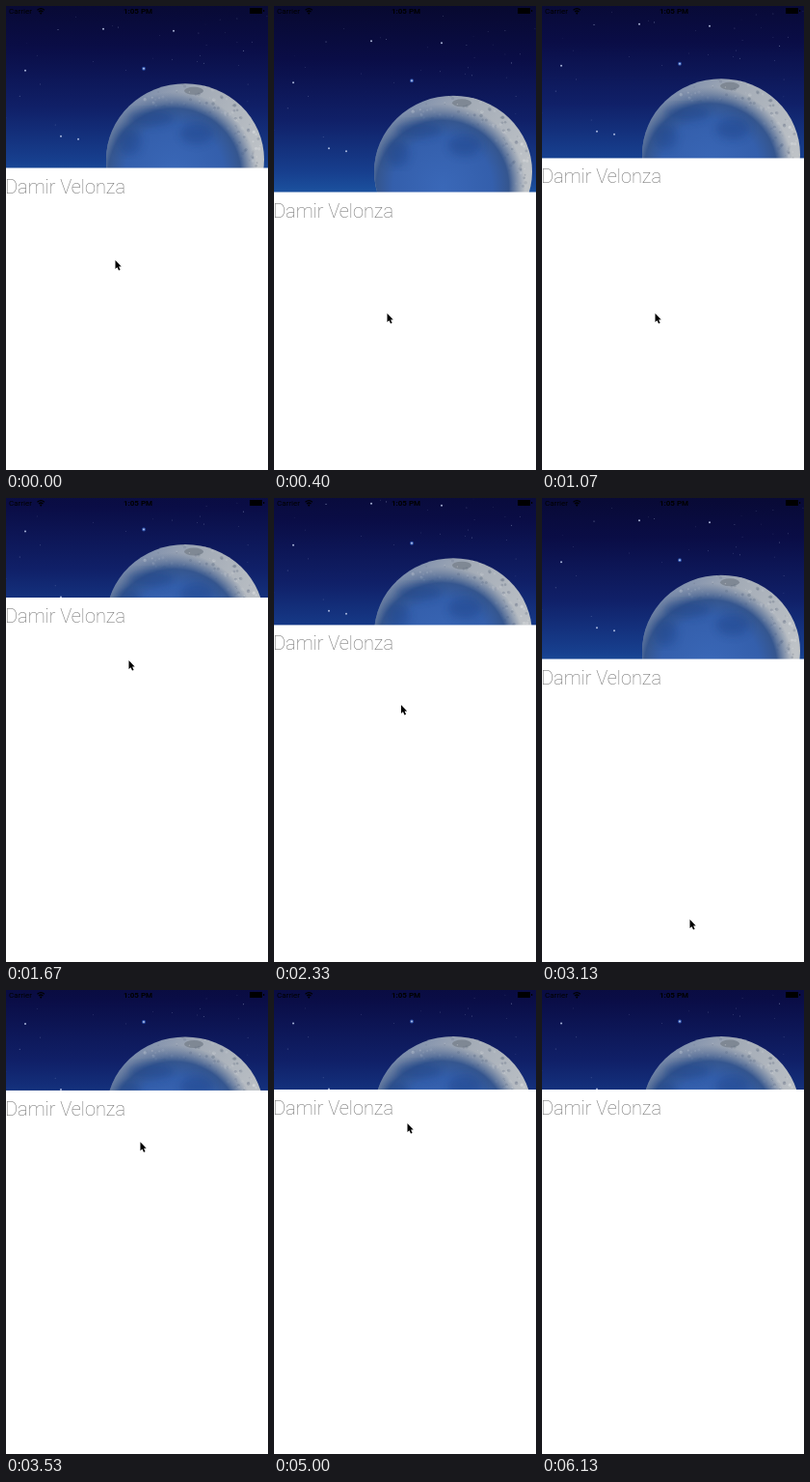
These frames come from a looping animation (272x480 px, 6.87 s). An HTML page:

```html
<!DOCTYPE html>
<html lang="en">
<head>
<meta charset="utf-8">
<title>Stretchy header</title>
<style>
  html, body { margin: 0; width: 100%; height: 100%; overflow: hidden; background: #fff; }
  svg { display: block; }
  text { font-family: Roboto, "Liberation Sans", sans-serif; }
  #name { font-size: 20px; font-weight: 100; fill: #707070; }
  .bar { font-size: 8px; fill: #000; }
</style>
</head>
<body>
<svg width="272" height="480" viewBox="0 0 272 480">
  <defs>
    <linearGradient id="night" x2="0" y2="1">
      <stop offset="0" stop-color="#07082c"/>
      <stop offset=".3" stop-color="#0a0d46"/>
      <stop offset=".6" stop-color="#102068"/>
      <stop offset=".85" stop-color="#173f8e"/>
      <stop offset="1" stop-color="#1e5ca8"/>
    </linearGradient>
    <linearGradient id="lit" x1=".1" y1="0" x2="1" y2=".5">
      <stop offset="0" stop-color="#6f83a8"/>
      <stop offset=".45" stop-color="#a3abb6"/>
      <stop offset="1" stop-color="#c0c4c8"/>
    </linearGradient>
    <radialGradient id="shade">
      <stop offset="0" stop-color="#3a68b8"/>
      <stop offset=".6" stop-color="#345fac"/>
      <stop offset=".8" stop-color="#35568f"/>
      <stop offset="1" stop-color="#566d94" stop-opacity="0"/>
    </radialGradient>
    <clipPath id="disc"><ellipse cx="186" cy="181" rx="82" ry="78.5"/></clipPath>
    <filter id="soft"><feGaussianBlur stdDeviation="4"/></filter>
  </defs>

  <g id="sky">
    <rect width="272" height="214" fill="url(#night)"/>
    <g id="stars" fill="#c4d0f0"></g>
    <g clip-path="url(#disc)">
      <rect x="104" y="102" width="164" height="158" fill="url(#lit)"/>
      <ellipse cx="195" cy="110" rx="10" ry="4" fill="#7f8894"/>
      <g id="craters"></g>
      <circle cx="175" cy="197" r="86" fill="url(#shade)"/>
      <g fill="#1f4288" opacity=".45" filter="url(#soft)">
        <ellipse cx="150" cy="138" rx="24" ry="8"/>
        <ellipse cx="128" cy="162" rx="12" ry="14"/>
        <ellipse cx="198" cy="154" rx="17" ry="11"/>
      </g>
    </g>
  </g>

  <rect id="page" width="272" height="480" fill="#fff"/>
  <text id="name" x="-1">Damir Velonza</text>

  <text class="bar" x="3" y="8">Carrier</text>
  <g fill="none" stroke="#000" stroke-width="1.2">
    <path d="M32.5 4.2q3.7-3.2 7.4 0M34 6q2.2-2 4.4 0"/>
    <circle cx="36.2" cy="7.4" r=".4"/>
  </g>
  <text class="bar" x="137" y="8" text-anchor="middle" font-weight="700">1:05 PM</text>
  <path d="M253 2h13v6h-13zM267 4h1.2v2h-1.2z"/>

  <path id="cursor" d="M.5 0v9l2-1.8 1.5 3.4 1.6-.7-1.5-3.3h2.6z"
        stroke="#fff" stroke-width="1" paint-order="stroke"/>
</svg>
<script>
const LOOP = 6870, STEP = 1000 / 15;
const $ = id => document.getElementById(id);

let seed = 7;
const rand = (a, b) => {
  seed = (seed * 16807) % 2147483647;
  return a + (b - a) * seed / 2147483647;
};

function dot(parent, cx, cy, r, opacity, fill) {
  const c = document.createElementNS("http://www.w3.org/2000/svg", "circle");
  const attrs = { cx, cy, r, opacity };
  if (fill) attrs.fill = fill;
  for (const k in attrs) c.setAttribute(k, attrs[k]);
  $(parent).append(c);
}

// The brightest stars, then faint ones
dot("stars", 143, 87, 2, .5, "#4b8cff");
for (const [x, y] of [[143, 87], [57, 157], [174, 48], [101, 46], [176, 8], [20, 89], [75, 160]])
  dot("stars", x, y, 1, .85);
for (let i = 0; i < 45; i++) dot("stars", rand(0, 272), rand(0, 150), rand(.3, .6), rand(.2, .5));

for (let i = 0; i < 160; i++) {
  const a = rand(-2.2, .3), d = rand(50, 80);
  dot("craters", 186 + d * Math.cos(a), 181 + d * Math.sin(a), rand(.5, 1.8),
      rand(.1, .35), i % 2 ? "#e8eaea" : "#566278");
}

// Smooth 0 to 1 between steps a and b
const ease = (k, a, b) => {
  const u = Math.min(1, Math.max(0, (k - a) / (b - a)));
  return u * u * (3 - 2 * u);
};

// Pull and spring back, collapse, pull past the rest height, spring back, collapse
const height = k => 167.5
  + 27 * (ease(k, 0, 5) - ease(k, 5, 11))
  - 64.5 * ease(k, 14, 22)
  + 109.5 * ease(k, 33, 39) - 45 * ease(k, 39, 44)
  - 64.5 * ease(k, 46.5, 53.5);

function pointer(k) {
  const down = ease(k, 0, 5), up = ease(k, 16, 24), down2 = ease(k, 33, 40.6),
        up2 = ease(k, 47, 54.1), exit = ease(k, 85, 92);
  return [113 + 4 * down + 10 * up + 26 * down2 - 15 * up2 + 15 * exit,
          263 + 55 * down - 150 * up + 268 * down2 - 298 * up2 - 165 * exit];
}

function draw(now) {
  const k = Math.floor((now % LOOP + 4) / STEP);
  const h = height(k), [x, y] = pointer(k);
  $("sky").setAttribute("transform", `translate(0 ${h / 2 - 106})`);
  $("page").setAttribute("y", h);
  $("name").setAttribute("y", h + 26);
  $("cursor").setAttribute("transform", `translate(${x} ${y})`);
}

let start;
function tick(now) {
  start ??= now;
  draw(now - start);
  requestAnimationFrame(tick);
}
draw(0);
requestAnimationFrame(tick);
</script>
</body>
</html>
```
